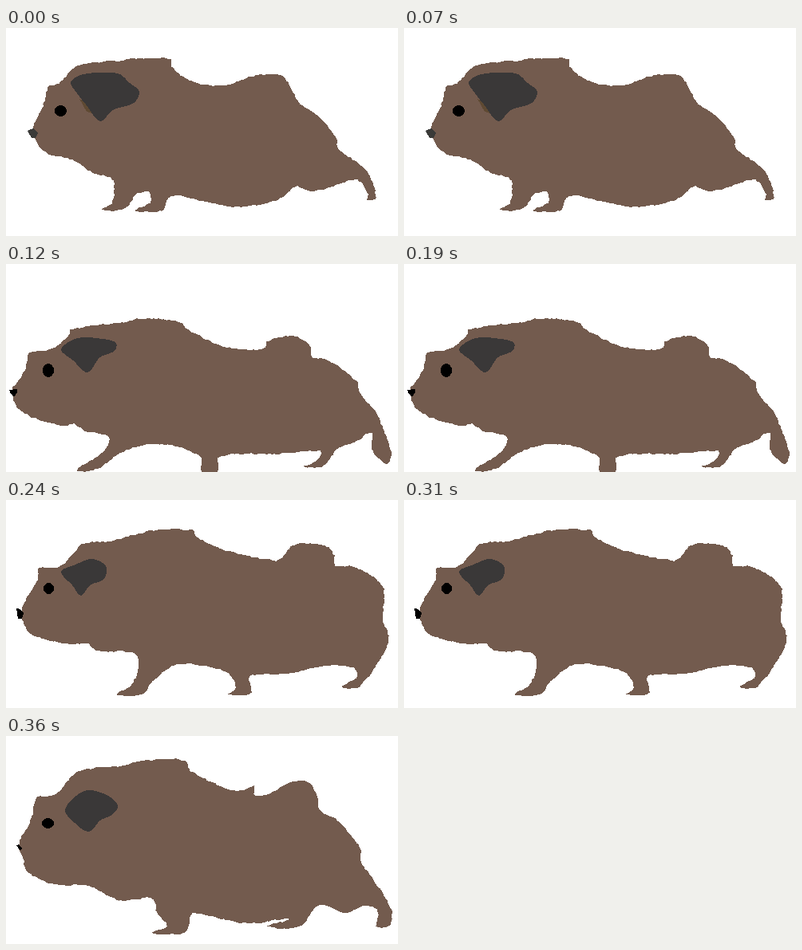
Animation, 491 px wide and 261 px high, one loop 480 ms. Source, as an HTML page:

```html
<!DOCTYPE html>
<html lang="en">
<head>
<meta charset="utf-8">
<title>Walking guinea pig</title>
<style>
  html, body { margin: 0; width: 100%; height: 100%; overflow: hidden; background: #fff; }
  svg { display: block; width: 100%; height: 100%; shape-rendering: crispEdges; }
  .body { fill: #735b4e; }
  .ear { fill: #3a3838; }
</style>
</head>
<body>
<svg id="stage" viewBox="0 0 491 261"></svg>
<script>
const STEP = 120;
const FUR_SPACING = 3.5;
const FUR_ROUGHNESS = 0.9;

// Key points of each pose, clockwise from the nose; curves and fur are computed.
const poses = [
  {
    body: "34,128 46,98 54,73 66,70 82,53 93,46 140,41 173,38 206,39 209,51 236,68 276,72 303,62 341,58 352,66 366,92 394,113 414,140 415,151 450,178 464,213 452,216 453,209 440,191 412,198 381,205 363,199 344,214 307,223 282,224 245,217 207,211 195,229 161,229 180,219 179,206 164,208 150,226 120,228 132,221 135,206 133,190 108,181 84,166 48,155",
    ear: "81,68 97,58 140,57 155,69 167,80 160,94 134,103 118,117 100,96 89,82",
    eye: [68.5, 104, 7.5, 7],
    nose: "27,129 34,126 40,132 37,138 32,138",
    noseColor: "#3a3a38",
    earShade: "92,89 101,105 107,107 104,96"
  },
  {
    body: "8,158 24,134 29,112 54,108 78,91 80,83 106,78 148,73 171,68 218,73 228,82 265,101 286,106 324,106 327,98 346,91 368,93 382,105 382,116 405,121 440,149 442,160 464,188 482,236 477,251 459,235 458,211 437,224 416,231 397,254 374,254 389,247 395,235 340,238 268,242 265,262 246,262 243,241 192,226 147,235 112,258 88,259 121,236 129,217 98,209 85,200 74,203 35,193 14,180",
    ear: "69,107 90,93 121,94 138,99 136,109 118,117 102,136 84,121",
    eye: [53, 133.5, 7, 8.5],
    nose: "4,158 14,157 14,161 10,167 6,163"
  },
  {
    body: "19,138 40,99 41,86 66,84 84,68 95,55 134,51 185,38 234,38 238,46 274,63 338,76 346,72 362,56 402,58 411,70 412,82 437,84 472,109 472,152 480,174 464,207 441,235 421,234 439,223 436,211 400,208 353,218 306,221 306,243 279,243 288,235 276,216 216,206 184,227 171,244 139,244 160,229 163,194 114,189 102,180 80,181 30,168 21,150",
    ear: "69,90 87,81 108,74 125,83 123,99 105,107 94,120 83,107",
    eye: [53.5, 111, 6.5, 7],
    nose: "13,136 18,137 22,142 20,149 15,149"
  },
  {
    body: "15,138 32,104 38,78 62,73 90,45 140,38 180,30 225,31 229,42 262,60 294,69 311,62 311,73 330,73 352,60 377,57 390,76 393,93 415,106 443,140 445,159 463,184 483,220 480,238 464,239 466,221 452,213 424,222 402,213 388,215 368,239 327,239 354,231 353,229 300,235 234,223 228,241 220,248 183,247 202,238 190,224 183,204 141,206 104,188 60,186 26,169 21,150",
    ear: "74,92 98,69 124,73 140,87 134,98 118,106 104,120 86,109",
    eye: [52.5, 109.5, 7.5, 6.5],
    nose: "13,137 16,136 20,141 18,144"
  }
];

let seed = 7;
const jitter = amount => {
  seed = seed * 16807 % 2147483647;
  return (seed / 2147483647 * 2 - 1) * amount;
};

// Closed Hermite curve through the key points; roughness shakes the samples into fur.
function outline(keys, roughness = 0) {
  const points = keys.split(" ").map(pair => pair.split(",").map(Number));
  const at = i => points[(i + points.length) % points.length];
  const distance = (a, b) => Math.hypot(b[0] - a[0], b[1] - a[1]);
  const tangent = i => {
    const [a, p, b] = [at(i - 1), at(i), at(i + 1)];
    // Sharp turns get short tangents, so they stay corners.
    const length = distance(a, p) + distance(p, b);
    return [(b[0] - a[0]) / length, (b[1] - a[1]) / length];
  };
  return points.flatMap((p, i) => {
    const q = at(i + 1), from = tangent(i), to = tangent(i + 1);
    const length = distance(p, q);
    const count = Math.ceil(length / FUR_SPACING);
    return Array.from({ length: count }, (_, k) => {
      const t = k / count, ease = t * t * (3 - 2 * t);
      const leave = t * (1 - t) ** 2 * length, arrive = t * t * (t - 1) * length;
      return [0, 1].map(axis =>
        p[axis] + (q[axis] - p[axis]) * ease + from[axis] * leave + to[axis] * arrive
        + jitter(roughness)).map(v => v.toFixed(1)).join();
    });
  }).join(" ");
}

function drawPose({ body, ear, earShade = "", eye: [x, y, rx, ry], nose, noseColor = "#000" }) {
  return `<g>
    <polygon class="body" points="${outline(body, FUR_ROUGHNESS)}"/>
    <polygon points="${earShade}" fill="#5f4a33"/>
    <polygon class="ear" points="${outline(ear)}"/>
    <ellipse cx="${x}" cy="${y}" rx="${rx}" ry="${ry}"/>
    <polygon points="${nose}" fill="${noseColor}"/>
  </g>`;
}

const stage = document.getElementById("stage");
stage.innerHTML = poses.map(drawPose).join("");
const groups = [...stage.children];
const start = performance.now();

function render(now) {
  const current = Math.floor(Math.max(0, now - start) / STEP) % groups.length;
  groups.forEach((group, i) => group.style.display = i === current ? "" : "none");
  requestAnimationFrame(render);
}
render(start);
</script>
</body>
</html>
```
